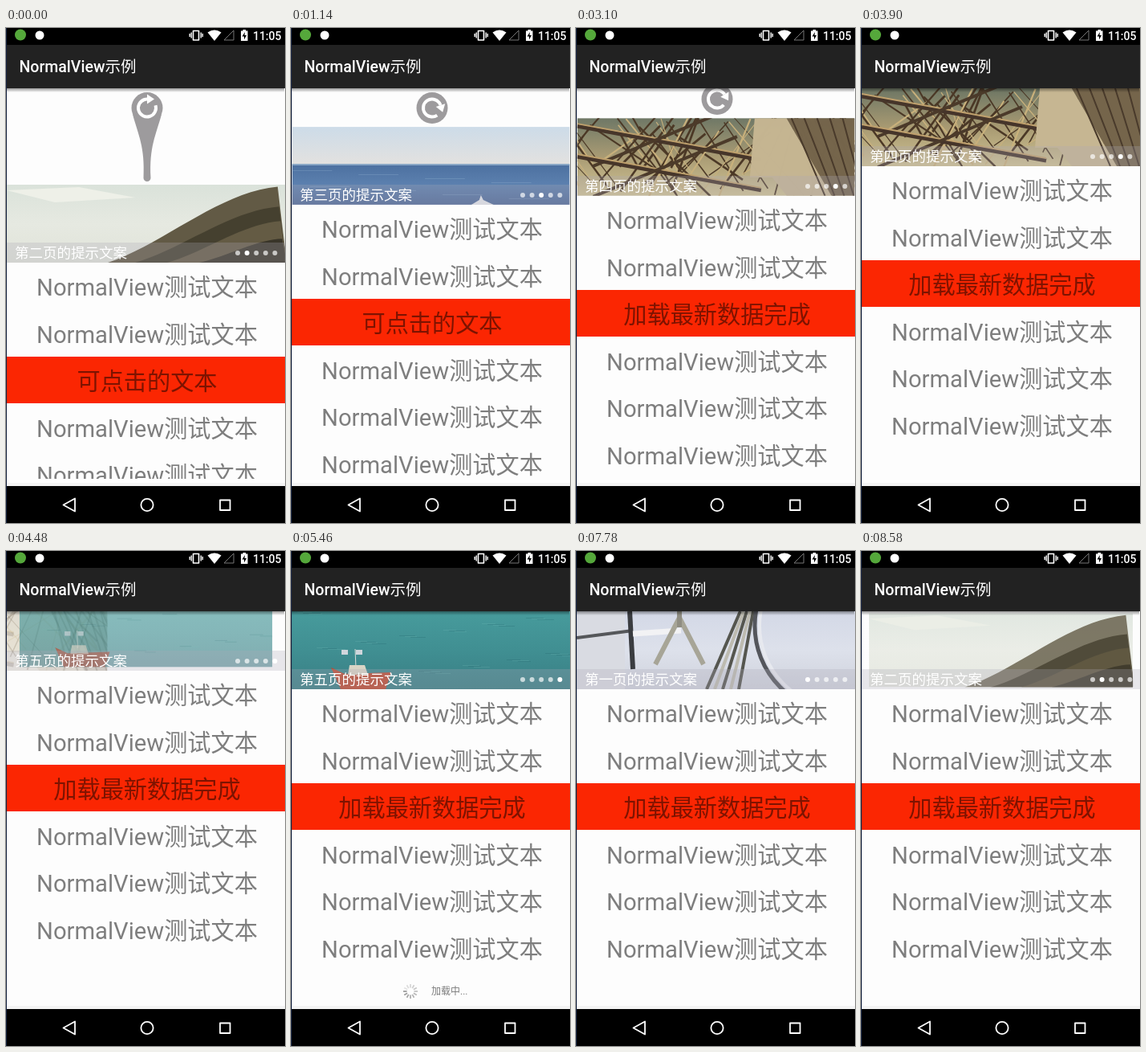
Animation, 348 px wide and 616 px high, one loop 8.62 s. Source, as an HTML page with a canvas:

```html
<!DOCTYPE html>
<html lang="zh">
<head>
<meta charset="utf-8">
<style>
html, body { margin: 0; width: 100%; height: 100%; overflow: hidden; background: #000; }
canvas { display: block; width: 348px; height: 616px; }
</style>
</head>
<body>
<canvas id="stage" width="348" height="616"></canvas>
<script>
const c = document.getElementById('stage').getContext('2d');
const LOOP = 8620, W = 347, BANNER = 97, TOP = 75, ROW = 58.5;
const FONT = 'Roboto, "Noto Sans CJK SC", "Noto Sans CJK", sans-serif';
const NUMS = '一二三四五';

const clamp = x => Math.max(0, Math.min(1, x));
const easeOut = x => 1 - (1 - clamp(x)) ** 2;

function random(seed) {
  return () => (seed = seed * 16807 % 2147483647) / 2147483647;
}
function rect(x, y, w, h, fill) {
  c.fillStyle = fill;
  c.fillRect(x, y, w, h);
}
function shape(d, fill) {
  c.fillStyle = fill;
  c.fill(new Path2D(d));
}
function outline(d, color, width) {
  c.strokeStyle = color;
  c.lineWidth = width;
  c.stroke(new Path2D(d));
}
function line(x1, y1, x2, y2, color, width) {
  outline(`M${x1} ${y1}L${x2} ${y2}`, color, width);
}
function disc(x, y, r, fill) {
  c.beginPath();
  c.arc(x, y, r, 0, 7);
  c.fillStyle = fill;
  c.fill();
}
function ring(x, y, r, color, width) {
  c.beginPath();
  c.arc(x, y, r, 0, 7);
  c.strokeStyle = color;
  c.lineWidth = width;
  c.stroke();
}
function text(s, x, y, size, fill, weight = 400, align = 'left') {
  c.font = `${weight} ${size}px ${FONT}`;
  c.textAlign = align;
  c.fillStyle = fill;
  c.fillText(s, x, y);
}
function fade(y, h, ...colors) {
  const g = c.createLinearGradient(0, y, 0, y + h);
  colors.forEach((color, i) => g.addColorStop(i / (colors.length - 1), color));
  rect(0, y, W, h, g);
}

function bike() {
  fade(0, BANNER, '#d3d8e6', '#dde1eb', '#cfd2dc');
  rect(0, 0, 60, BANNER, '#d9dbe2');
  line(0, 33, 70, 24, '#55575a', 4);
  line(66, 0, 70, 72, '#3a3c40', 6);
  line(70, 28, 130, 24, '#f2f2f4', 7);
  for (const side of [-1, 1]) line(128, 8, 128 + side * 30, 66, '#a7a597', 6);
  line(128, 0, 128, 20, '#8f8d82', 6);
  for (let i = 0; i < 5; i++) line(204 + i * 4, 0, 162 + i * 10, BANNER, i % 2 ? '#bdbbb0' : '#55564f', 4);
  ring(330, 18, 108, '#54565c', 5);
  ring(330, 18, 102, '#e7e9ef', 4);
}

// One hillside rising from x0 at the bottom to the right edge.
function slope(x0, height, color) {
  c.beginPath();
  for (let u = 0; u <= 1; u += .05) {
    const rise = (Math.sin(u * Math.PI / 2) + u * u * (3 - 2 * u)) / 2;
    c.lineTo(x0 + u * (W - x0 + 2), BANNER - height * rise);
  }
  c.lineTo(W + 2, BANNER);
  c.fillStyle = color;
  c.fill();
}
function hill() {
  fade(0, BANNER, '#dae2da', '#e6e9e1', '#e0e3d9');
  shape('M0 7L90 3L160 16L60 22Z', '#eef0e8');
  slope(126, 95, '#625a45');
  slope(160, 70, '#45402f');
  slope(200, 52, '#645b44');
  slope(240, 30, '#393529');
}

function sea() {
  fade(0, 47, '#ccdbe8', '#e3e1df');
  fade(47, 50, '#4b6f9f', '#5a7fae', '#4d6897');
  rect(0, 46, W, 2, '#8ba8c6');
  for (let i = 0; i < 8; i++) rect(i * 83 % 310, 54 + i * 5, 50, 1, 'rgba(150,180,210,.3)');
  shape('M224 97L234 91L236 85L239 91L252 97Z', '#e8ebef');
}

function tower() {
  const rnd = random(11);
  fade(0, BANNER, '#6d7664', '#a89a72', '#cfc293');
  for (let i = 0; i < 70; i++) {
    const x = rnd() * 420 - 60, lean = (i % 2 ? 1 : -1) * (20 + rnd() * 70);
    line(x, rnd() * 30 - 10, x + lean, 60 + rnd() * 40, i % 3 ? '#4b3826' : '#c9b17c', 1 + rnd() * 2);
  }
  for (const y of [10, 48]) {
    line(0, y, 230, y + 42, '#46352a', 5);
    line(0, y - 3, 230, y + 39, '#bfa06d', 2);
    line(20, y + 50, 200, y - 25, '#4b3a2a', 4);
  }
  shape('M222 0H262L318 97H262L244 74H216Z', '#c6b692');
  shape('M262 0L318 97H347V0Z', '#75654b');
  for (let i = 0; i < 6; i++) line(268 + i * 16, 0, 310 + i * 12, BANNER, '#493a2b', 2);
}

function boat() {
  fade(0, BANNER, '#479b9c', '#408f92', '#397e84');
  for (let i = 0; i < 45; i++) rect(i * 79 % 340, i * 37 % 96, 14 + i % 9, 1, i % 2 ? 'rgba(120,190,185,.22)' : 'rgba(20,80,90,.2)');
  line(80, 71, 79, 47, '#d8ddd8', 1);
  for (const x of [62, 80]) rect(x, 48, 8, 6, '#d0d6dc');
  shape('M49 70L66 78L124 76L117 97H61Z', '#bd4a30');
  shape('M72 67H91L95 79H70Z', '#d9d4c5');
}

const pages = [bike, hill, sea, tower, boat];

function drawPage(i, x, scale, alpha) {
  c.save();
  c.globalAlpha = alpha;
  c.translate(x + W / 2, BANNER / 2);
  c.scale(scale, scale);
  c.translate(-W / 2, -BANNER / 2);
  c.beginPath();
  c.rect(0, 0, W, BANNER);
  c.clip();
  pages[i]();
  c.restore();
}

function banner(t, y) {
  const turn = Math.floor((t - 235) / 1985);
  const page = (turn + 2) % 5;
  const rest = turn < 0 ? 0 : (1 - clamp((t - 235 - turn * 1985) / 1500)) ** 5;
  c.save();
  c.translate(1, y);
  if (rest > .2) drawPage((page + 4) % 5, -W * (1 - rest), 1, (rest - .2) / .8);
  drawPage(page, 0, 1 - rest / 4, 1 - rest);
  rect(0, 72, W, 25, 'rgba(170,168,180,.27)');
  text(`第${NUMS[page]}页的提示文案`, 10, 91, 17.5, '#fff');
  for (let i = 0; i < 5; i++) disc(288 + i * 11.6, 85, 3, i === page ? '#fff' : 'rgba(255,255,255,.68)');
  c.restore();
}

function drop(t, offset) {
  const y = TOP + Math.min(offset, 48) - 23.5;
  const pull = Math.max(0, offset - 48) / 72;
  const r = 19.5 - 15 * Math.sqrt(pull), end = y + 87 * pull;
  disc(176, y, 19.5, '#9d9b9d');
  if (pull > 0) {
    c.beginPath();
    c.moveTo(158, y + 8);
    c.bezierCurveTo(165, y + 8 + 26 * pull, 178 - r, y + 48 * pull, 176 - r, end);
    c.arc(176, end, r, Math.PI, 0, true);
    c.bezierCurveTo(174 + r, y + 48 * pull, 187, y + 8 + 26 * pull, 194, y + 8);
    c.fill();
  }
  c.save();
  c.translate(176, y);
  if (t > 450) c.rotate((t + 60) / 1000 * 2 * Math.PI);
  c.beginPath();
  c.arc(0, 0, 11, -.3, Math.PI * 1.5);
  c.strokeStyle = '#fff';
  c.lineWidth = 4;
  c.stroke();
  shape('M0 -17L9 -11L0 -5Z', '#fff');
  c.restore();
}

function footer(t) {
  const step = Math.floor(t / 100);
  for (let i = 0; i < 12; i++) {
    const a = i * Math.PI / 6, dx = Math.cos(a), dy = Math.sin(a);
    const shade = 150 + (step + 12 - i) % 12 * 7;
    line(149 + 4.5 * dx, 548 + 4.5 * dy, 149 + 9 * dx, 548 + 9 * dy, `rgb(${shade},${shade},${shade})`, 1.7);
  }
  text('加载中...', 175, 552, 12, '#7c7c7c');
}

function listOffset(t) {
  if (t < 3050) return 120 - 72 * easeOut((t - 100) / 400);
  if (t < 4000) return 48 * (1 - easeOut((t - 3050) / 400));
  return -25 * (easeOut((t - 4300) / 250) - easeOut((t - 4600) / 250));
}

function content(t) {
  const offset = Math.round(listOffset(t));
  rect(1, 75, W, 495, '#fdfdfd');
  c.save();
  c.beginPath();
  c.rect(1, 75, W, 486);
  c.clip();
  if (offset > 0) drop(t, offset);
  banner(t, TOP + offset);
  for (let i = 0; i < 6; i++) {
    const y = Math.floor(172.5 + offset + i * ROW), hot = i === 2;
    if (hot) rect(1, y, W, 58, '#fb2602');
    const label = !hot ? 'NormalView测试文本' : t < 3050 ? '可点击的文本' : '加载最新数据完成';
    text(label, 176, y + 41, 29.2, hot ? '#7d1301' : '#7e7e7e', 400, 'center');
  }
  if (t >= 4600 && t < 7550) footer(t);
  c.restore();
  rect(1, 566, W, 4, '#f4f4f4');
  fade(75, 5, 'rgba(0,0,0,.4)', 'rgba(0,0,0,0)');
}

function statusBar() {
  rect(0, 0, 348, 21, '#000');
  disc(18, 8.5, 7, '#55a83b');
  disc(42, 9, 5.5, '#fff');
  outline('M233.5 3.5h7v11.5h-7Z', '#fff', 1.6);
  for (const side of [-1, 1]) {
    for (const k of [0, 1]) rect(236.5 + side * (6 + 2 * k), 5.5 + 1.5 * k, 1.4, 7 - 3 * k, '#fff');
  }
  shape('M260 16L251.5 5.5Q260 -.5 268.5 5.5Z', '#fff');
  outline('M272 15h12v-12Z', '#777', 1);
  shape('M293 3.5h2.5v-1.5h3.5v1.5h2.5v12.5h-8.5Z', '#fff');
  shape('M298 5l-3.5 5.5h2.5v4l3 -5.5h-2.5Z', '#000');
  text('11:05', 343.5, 14.5, 14, '#fff', 500, 'right');
}

function bars() {
  statusBar();
  rect(0, 21, 348, 54, '#222');
  text('NormalView', 16.5, 55, 19.5, '#fff', 500);
  const end = 16.5 + c.measureText('NormalView').width;
  text('示例', end, 55, 19.5, '#fff');

  rect(0, 570, 348, 46, '#000');
  c.lineJoin = 'round';
  outline('M71.5 593.5l14.5 -8v16Z', '#fff', 1.8);
  ring(176, 593.5, 7.6, '#fff', 1.8);
  outline('M267 587.5h12.5v12.5h-12.5Z', '#fff', 1.8);
  rect(0, 0, 1, 616, '#14213f');
}

function frame(now) {
  const t = now % LOOP;
  content(t);
  bars();
  requestAnimationFrame(frame);
}
frame(0);
</script>
</body>
</html>
```
